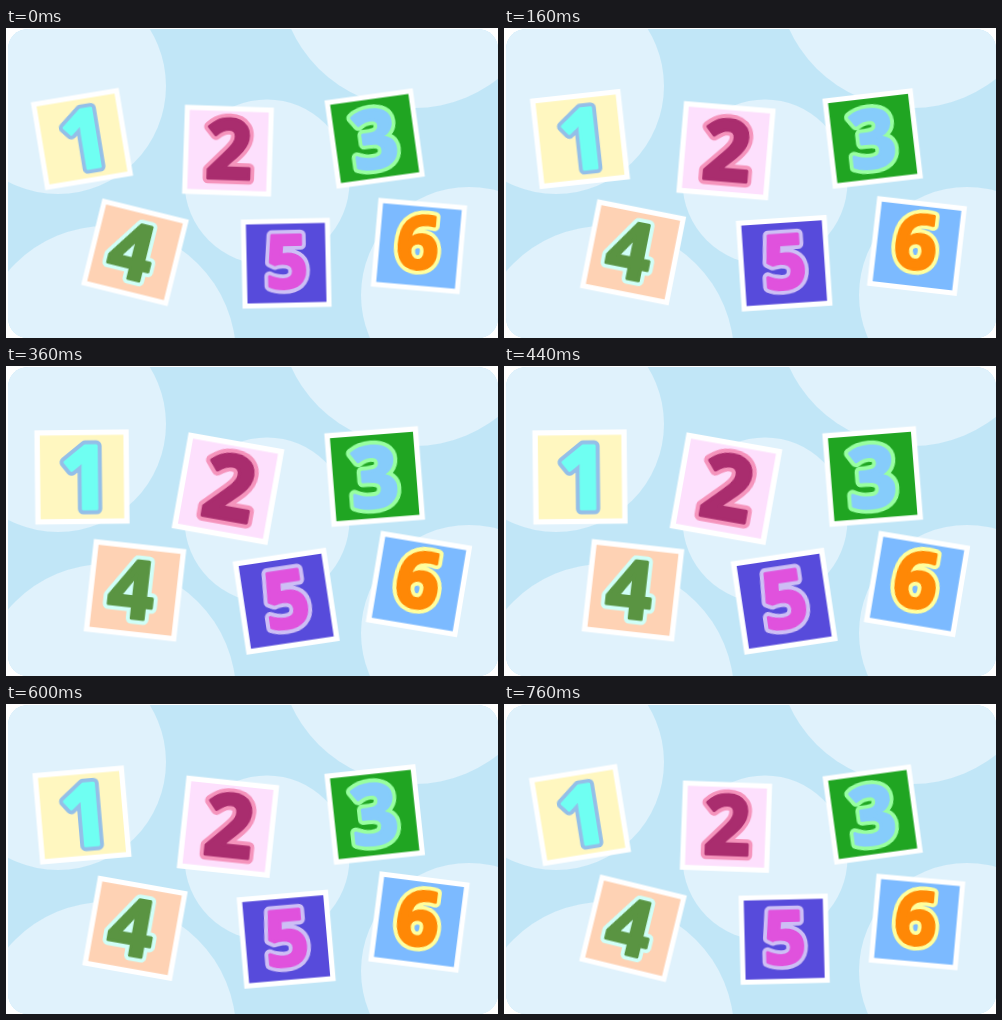
Write an HTML page that moves like this. It is 492x310 px and loops after 0.8 s.

```html
<!DOCTYPE html>
<html lang="en">
<head>
<meta charset="utf-8">
<title>Number cards</title>
<style>
  html, body { margin: 0; width: 100%; height: 100%; overflow: hidden; background: #fff; }
  svg { display: block; }
  .card { animation: sway 400ms cubic-bezier(.37, 0, .63, 1) infinite alternate; }
  .card text {
    font-family: "Open Sans", "Noto Sans", sans-serif;
    font-weight: 700;
    text-anchor: middle;
    stroke-linejoin: round;
  }
  .edge { stroke-width: 10.5px; }
  .ink { stroke-width: 3px; }
  @keyframes sway {
    from { transform: translate(var(--x), var(--y)) rotate(var(--a)); }
    to { transform: translate(var(--x), var(--y)) rotate(var(--b)) scale(var(--s)); }
  }
</style>
</head>
<body>
<svg width="492" height="310" viewBox="0 0 492 310">
  <clipPath id="panel"><rect x="2" y="1" width="490" height="309" rx="20"/></clipPath>
  <g clip-path="url(#panel)">
    <rect width="492" height="310" fill="#c1e6f7"/>
    <g fill="#e0f2fc">
      <circle cx="52" cy="58" r="108"/>
      <circle cx="408" cy="-55" r="135"/>
      <circle cx="261" cy="154" r="82.5"/>
      <circle cx="100.5" cy="327.5" r="129.5"/>
      <circle cx="463" cy="267" r="108"/>
    </g>
  </g>
  <g id="cards"></g>
</svg>
<script>
  // x, y: card centre; a, b: end angles; s: end scale; dx, dy: digit offset
  const cards = [
    { x: 76, y: 111, a: -9.4, b: -.4, s: 1.06, size: 83, dx: 3, dy: .5, bg: '#fff7c0', ink: '#6ffff2', edge: '#94bfe8' },
    { x: 222, y: 122.7, a: 1.9, b: 10.3, s: 1.095, size: 82, dx: 1, dy: -1, bg: '#fde0fd', ink: '#a92d6e', edge: '#f594bc' },
    { x: 368.7, y: 110.5, a: -7.9, b: -4.4, s: 1.055, size: 80, dx: -.5, dy: 0, bg: '#20a522', ink: '#86ccfb', edge: '#98ffa0' },
    { x: 129, y: 224.3, a: 13.9, b: 6.2, s: 1.045, size: 77, dx: -3.5, dy: -.5, bg: '#fed2b4', ink: '#5a9442', edge: '#d0fff8' },
    { x: 280.2, y: 235.2, a: -1.2, b: -8.7, s: 1.06, size: 74, dx: .5, dy: -1.5, bg: '#574bdb', ink: '#e052dd', edge: '#cdbff5' },
    { x: 413, y: 218, a: 5, b: 9.6, s: 1.04, size: 74, dx: -1.5, dy: -3.5, bg: '#7cbaff', ink: '#ff8806', edge: '#ffff9e' }
  ];

  const digit = (c, n, part) =>
    `<text class="${part}" x="${c.dx}" y="${c.dy + c.size * .357}" font-size="${c.size}" fill="${c[part]}" stroke="${c[part]}">${n}</text>`;

  document.getElementById('cards').innerHTML = cards.map((c, i) => `
    <g class="card" style="--x:${c.x}px;--y:${c.y}px;--a:${c.a}deg;--b:${c.b}deg;--s:${c.s}">
      <rect x="-44.5" y="-44.5" width="89" height="89" fill="#fff"/>
      <rect x="-39.5" y="-39.5" width="79" height="79" fill="${c.bg}"/>
      ${digit(c, i + 1, 'edge')}
      ${digit(c, i + 1, 'ink')}
    </g>`).join('');
</script>
</body>
</html>
```
